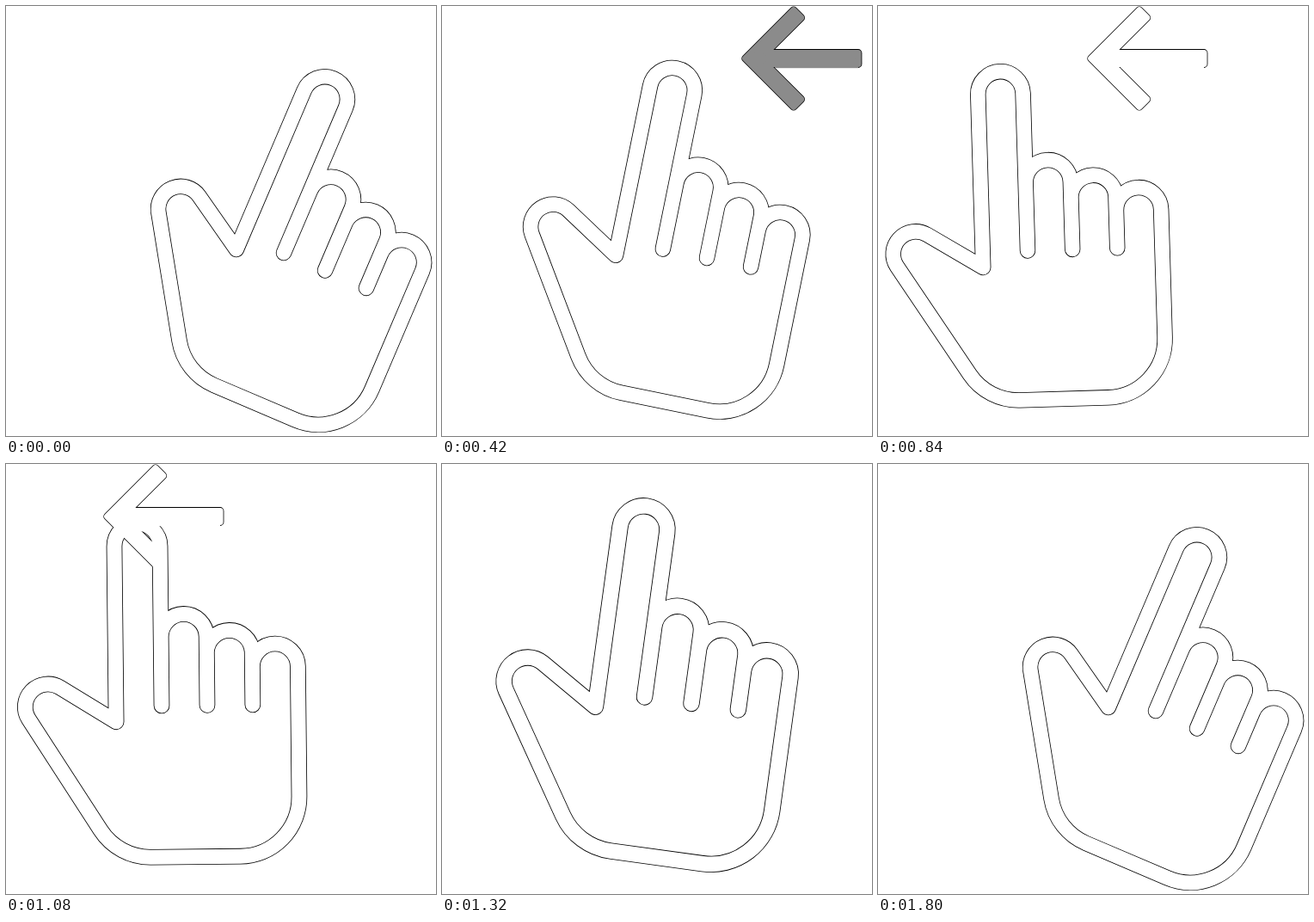
Animation of 500 by 500 pixels, one loop 1830 ms. Source, as an HTML page with a canvas:

```html
<!DOCTYPE html>
<html>
<head>
<meta charset="utf-8">
<style>
html, body { margin: 0; width: 100%; height: 100%; overflow: hidden; background: #fff; }
canvas { display: block; }
</style>
</head>
<body>
<canvas id="stage" width="500" height="500"></canvas>
<script>
const ctx = document.getElementById('stage').getContext('2d');
const LOOP = 1830, STEP = 30;

// Centre line of the hand; the origin is the foot of the index finger.
const hand = new Path2D(`M0 0V-183A26.1 26.1 0 0 0 -52.3 -183V18L-116.5 -22.1
  A26.1 26.1 0 0 0 -152.4 13.9L-71.5 141.8A68 68 0 0 0 -14 173.5H88.5
  A68 68 0 0 0 156.5 105.5V-43.5A26.1 26.1 0 0 0 104.3 -43.5
  M104.3 0V-61A26.1 26.1 0 0 0 52.2 -61M52.2 0V-78.6A26.1 26.1 0 0 0 0 -78.6`);

// Core of the arrow, rounded off by its stroke; the origin is above the tip.
const arrow = new Path2D(`M4.7 61L60.85 4.85L69.65 13.65L28.8 54.5H136V67.5H28.8
  L69.65 108.35L60.85 117.15Z`);

// time, x, y, degrees, scale
const poses = [
  [0, 323, 287, 23.1, 1],
  [270, 291, 284, 17.3, 1],
  [570, 220.5, 282, 5.5, 1],
  [840, 174, 284.5, -1.7, 1],
  [1080, 181, 281, -0.6, 1.015],
  [1320, 235.5, 271, 7.8, 1.053],
  [1620, 313, 277, 20.8, 1.033],
  [1800, 323, 287, 23.1, 1]
];

const slope = (i, k) =>
  (poses[i + 1][k] - poses[i][k]) / (poses[i + 1][0] - poses[i][0]);

function tangent(i, k) {
  if (i === 0 || i === poses.length - 1) return 0;
  const before = poses[i][0] - poses[i - 1][0];
  const after = poses[i + 1][0] - poses[i][0];
  return (after * slope(i - 1, k) + before * slope(i, k)) / (before + after);
}

// Smooth curve through the poses
function poseAt(t) {
  t = Math.min(t, 1800);
  let i = 0;
  while (i < poses.length - 2 && t >= poses[i + 1][0]) i++;
  const a = poses[i], b = poses[i + 1], h = b[0] - a[0], u = (t - a[0]) / h, v = 1 - u;
  return [1, 2, 3, 4].map(k =>
    v * v * (1 + 2 * u) * a[k] + u * u * (3 - 2 * u) * b[k] +
    h * u * v * (v * tangent(i, k) - u * tangent(i + 1, k)));
}

function arrowX(t) {
  const s = t - 270;
  return 359 - 0.1133 * s - 3.34e-4 * s * (s - 300) - 1.638e-7 * s * (s - 300) * (s - 570);
}

function drawArrow(t, color, width) {
  ctx.setTransform(1, 0, 0, 1, arrowX(t), 0);
  ctx.fillStyle = ctx.strokeStyle = color;
  ctx.lineWidth = width;
  ctx.fill(arrow);
  ctx.stroke(arrow);
}

function drawHand([x, y, angle, scale], color, width) {
  ctx.setTransform(1, 0, 0, 1, x, y);
  ctx.rotate(angle * Math.PI / 180);
  ctx.scale(scale, scale);
  ctx.strokeStyle = color;
  ctx.lineWidth = width;
  ctx.stroke(hand);
}

function draw(now) {
  const t = Math.floor(now % LOOP / STEP) * STEP;
  const pose = poseAt(t);
  const light = Math.min(1, (t - 240) / 330, (1230 - t) / 150);

  ctx.setTransform(1, 0, 0, 1, 0, 0);
  ctx.fillStyle = '#fff';
  ctx.fillRect(0, 0, 500, 500);
  ctx.lineCap = ctx.lineJoin = 'round';

  // Both outlines go below both fills, so only the joint silhouette is edged.
  if (light > 0) drawArrow(t, '#000', 8.8);
  drawHand(pose, '#000', 18.4);
  if (light > 0) {
    const g = Math.round(255 * light);
    drawArrow(t, `rgb(${g},${g},${g})`, 7.2);
    ctx.fillRect(39, 69, 97, 3.2); // the shaft has no lower edge
  }
  drawHand(pose, '#fff', 16.8);
  requestAnimationFrame(draw);
}
requestAnimationFrame(draw);
</script>
</body>
</html>
```
